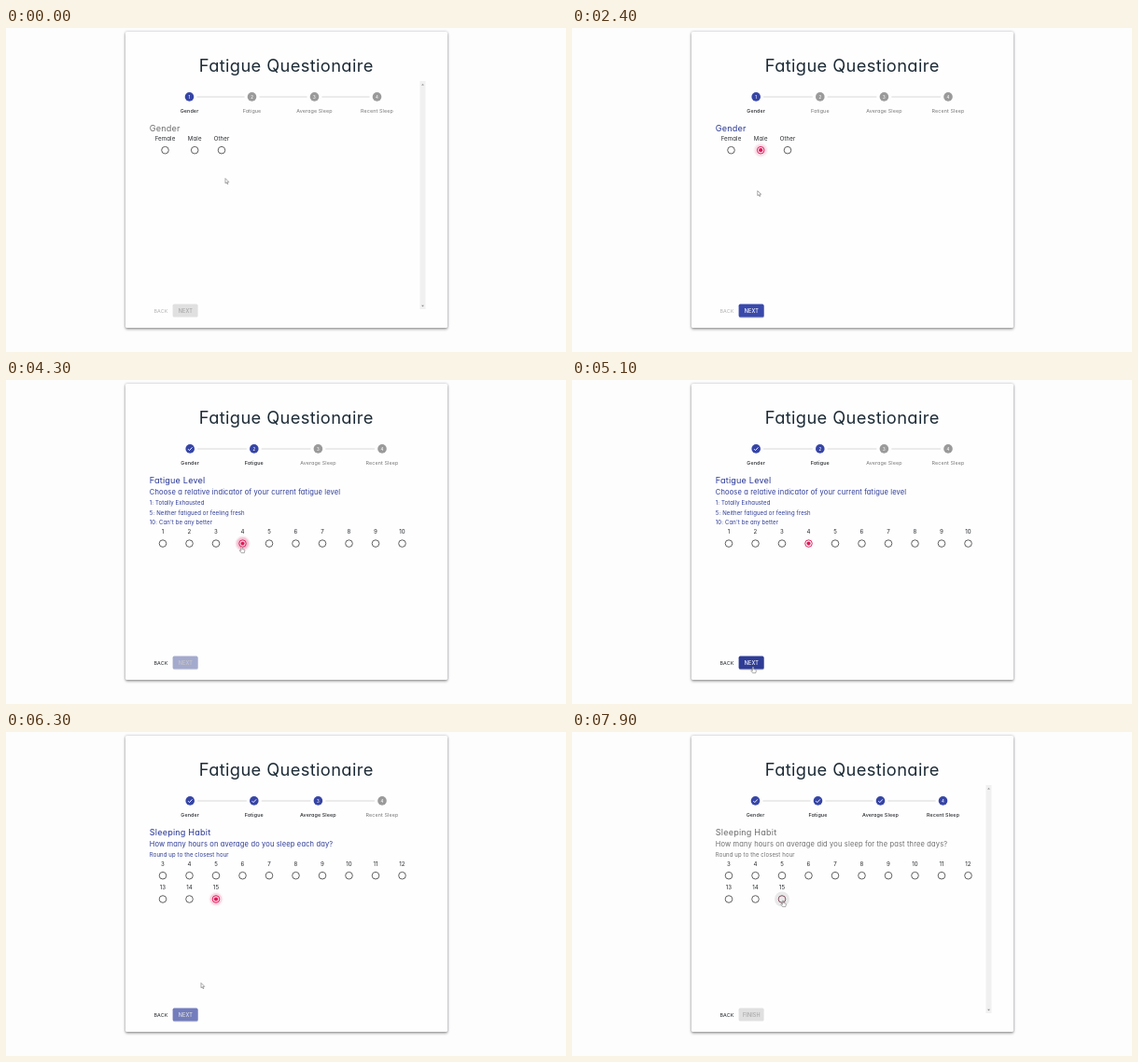
Recreate the animation shown at these times as an HTML page. Size 600x348 px, loop 8 s.

```html
<!DOCTYPE html>
<html lang="en">
<head>
<meta charset="utf-8">
<title>Fatigue Questionaire</title>
<style>
  html, body { margin: 0; width: 100%; height: 100%; overflow: hidden; background: #fdfdfe; }
  .card {
    position: absolute; left: 128px; top: 4px; width: 345px; height: 317.5px;
    background: #fefefe; border-radius: 1.5px;
    box-shadow: 0 1.5px 3px rgba(0, 0, 0, .38), 0 0 3px rgba(0, 0, 0, .22);
  }
  svg { position: absolute; left: 0; top: 0; width: 600px; height: 348px; }
  text {
    font-family: Inter, "Open Sans", sans-serif;
    font-feature-settings: "cv11";
    letter-spacing: .02em;
  }
  .mid { text-anchor: middle; }
</style>
</head>
<body>
<div class="card"></div>
<svg viewBox="0 0 600 348">
  <text class="mid" x="300.2" y="47" font-size="18.3" fill="#1d2b36">Fatigue Questionaire</text>
  <g id="scene"></g>
</svg>
<script>
const LOOP = 8000;
const INK = '#25282c', MUTED = '#777';
const GREY = [224, 224, 224], BLUE = [57, 73, 171], NAVY = [46, 60, 150];
const RING = [88, 88, 88], PINK = [224, 25, 90], TEXT_GREY = [110, 110, 110], TEXT_BLUE = [43, 57, 150];
const STEPS = ['Gender', 'Fatigue', 'Average Sleep', 'Recent Sleep'];

// Radio rows: columns 28.5 px apart, ten to a row
const grid = (first, count, top) => Array.from({ length: count }, (_, i) => ({
  label: String(first + i),
  x: 168 + 28.5 * (i % 10),
  y: top + 25.3 * Math.floor(i / 10)
}));

// start: page appears; pick: option chosen; press: button pushed
const pages = [
  {
    start: 0, pick: 2150, press: 2980, choice: 1, heading: 'Gender', notes: [],
    radios: [['Female', 170.5], ['Male', 202.2], ['Other', 231]].map(([label, x]) => ({ label, x, y: 131.2 }))
  },
  {
    start: 3200, pick: 4200, press: 5180, choice: 3, heading: 'Fatigue Level',
    sub: 'Choose a relative indicator of your current fatigue level',
    notes: ['1: Totally Exhausted', '5: Neither fatigued or feeling fresh', "10: Can't be any better"],
    radios: grid(1, 10, 175.6)
  },
  {
    start: 5300, pick: 6150, press: 7180, choice: 12, heading: 'Sleeping Habit',
    sub: 'How many hours on average do you sleep each day?',
    notes: ['Round up to the closest hour'], radios: grid(3, 13, 154.2)
  },
  {
    start: 7300, pick: 8000, press: 9000, choice: 12, heading: 'Sleeping Habit',
    sub: 'How many hours on average did you sleep for the past three days?',
    notes: ['Round up to the closest hour'], radios: grid(3, 13, 154.2)
  }
];

// Pointer tip: time, x, y
const path = [
  [0, 235, 161.5], [300, 200, 270], [600, 62, 278], [800, 40, 230], [1000, 118, 188],
  [1350, 229, 132], [1480, 228, 129], [1600, 212.5, 118.5], [1850, 203, 130], [2250, 203, 131],
  [2700, 187, 298], [2950, 186, 301], [3250, 187, 301], [3900, 250, 182], [4100, 252.5, 179],
  [4350, 252.5, 179], [4750, 200, 300], [5000, 194, 308], [5350, 194, 308], [5900, 224, 182],
  [6180, 225, 179], [6300, 209, 269.5], [6600, 200, 327], [6900, 195, 312], [7150, 192, 304],
  [7350, 192, 304], [7750, 225, 183], [7850, 226, 181], [8000, 226, 181]
];

const clamp = v => Math.max(0, Math.min(1, v));
const ease = v => { v = clamp(v); return v * v * (3 - 2 * v); };
const mix = (a, b, k) => `rgb(${a.map((v, i) => Math.round(v + (b[i] - v) * k))})`;
const pageAt = t => pages.findLastIndex(p => t >= p.start);

function pointer(t) {
  const i = Math.max(1, path.findIndex(p => p[0] >= t));
  const [t0, x0, y0] = path[i - 1], [t1, x1, y1] = path[i];
  const k = ease((t - t0) / (t1 - t0));
  return { x: x0 + (x1 - x0) * k, y: y0 + (y1 - y0) * k };
}

const overRadio = (p, r) => Math.hypot(p.x - r.x, p.y - r.y) < 7;
const overButton = p => p.x > 178.5 && p.x < 206 && p.y > 296 && p.y < 311;

// Share of the last 160 ms the pointer spent on a radio
function glow(t, page, r) {
  let n = 0;
  for (let k = 0; k < 8; k++) {
    const s = t - k * 20;
    if (s >= page.start && overRadio(pointer(s), r)) n++;
  }
  return n / 8;
}

const text = (x, y, size, fill, str, attrs = '') =>
  `<text x="${x}" y="${y}" font-size="${size}" fill="${fill}" ${attrs}>${str}</text>`;
const label = (x, y, size, fill, str, weight = 400) =>
  text(x, y, size, fill, str, `class="mid" font-weight="${weight}"`);
const disc = (x, y, r, fill, attrs = '') =>
  `<circle cx="${x}" cy="${y}" r="${r}" fill="${fill}" ${attrs}/>`;

function stepper(active, narrow) {
  const first = narrow ? 196.5 : 197.2, gap = narrow ? 67 : 68.6;
  return STEPS.map((name, i) => {
    const x = first + gap * i, lit = i <= active;
    const mark = i < active
      ? `<path d="M${x - 2.2} 74.1l1.5 1.5 3-3.2" fill="none" stroke="#fff" stroke-width=".9"/>`
      : label(x, 75.5, 4.3, '#fff', i + 1, 500);
    const line = i < 3
      ? `<path d="M${x + 8} 74H${x + gap - 8}" stroke="#bdbdbd" stroke-width=".6"/>` : '';
    return line + disc(x, 73.9, 4.8, lit ? mix(BLUE, NAVY, .3) : '#9a9a9a') + mark +
      label(x, 90.7, 5.4, lit ? INK : MUTED, name, lit ? 500 : 400);
  }).join('');
}

const scrollbar = () =>
  `<rect x="443.5" y="57" width="6" height="245" fill="#f0f0f0"/>
   <path d="M445.1 61.6l1.4-1.6 1.4 1.6zM445.1 297.8l1.4 1.6 1.4-1.6z" fill="#8a8a8a"/>`;

function radio(t, page, r, i) {
  const chosen = i === page.choice;
  const dot = chosen ? ease((t - page.pick) / 120) : 0;
  const tint = chosen ? ease((t - page.pick + 150) / 150) : 0;
  const halo = glow(t, page, r);
  const pulse = dot && t < page.pick + 450 ? 1 - (t - page.pick) / 450 : 0;
  return disc(r.x, r.y, 8, dot ? mix(RING, PINK, .8) : '#333', `opacity="${halo * .1}"`) +
    disc(r.x, r.y, 6.5, mix(RING, PINK, 1), `opacity="${pulse * .22}"`) +
    disc(r.x, r.y, 3.8, 'none', `stroke="${mix(RING, PINK, tint)}" stroke-width=".95"`) +
    disc(r.x, r.y, 2.1 * dot, mix(PINK, PINK, 0)) +
    label(r.x, r.y - 10.4, 6.1, INK, r.label);
}

function form(t, page) {
  const focus = ease((t - page.pick) / 60) * (1 - ease((t - page.press) / 80));
  const tone = mix(TEXT_GREY, TEXT_BLUE, focus);
  return text(153.8, 111.3, 9.1, tone, page.heading) +
    (page.sub ? text(153.8, 122.8, 7.5, tone, page.sub) : '') +
    page.notes.map((n, i) => text(153.8, 133.9 + 10.75 * i, 6, tone, n)).join('') +
    page.radios.map((r, i) => radio(t, page, r, i)).join('');
}

function buttons(t, page, index, p) {
  const on = ease((t - page.pick) / 250);
  const hover = on === 1 && overButton(p);
  const wave = clamp((t - page.press) / 300);
  const fill = hover ? mix(NAVY, NAVY, 0) : mix(GREY, BLUE, on);
  return text(158.4, 305.6, 5.4, index ? INK : '#b4b4b4', 'BACK') +
    `<rect x="179" y="297.8" width="27" height="13.8" rx="2" fill="#000" opacity="${on * .22}"/>
     <rect x="178.6" y="296.6" width="27" height="14" rx="1.6" fill="${fill}"/>` +
    (wave > 0
      ? `<clipPath id="face"><rect x="178.6" y="296.6" width="27" height="14" rx="1.6"/></clipPath>` +
        disc(p.x, p.y, 4 + 20 * wave, '#fff', 'opacity=".22" clip-path="url(#face)"')
      : '') +
    label(192.3, 305.6, 5.5, mix([166, 166, 166], [255, 255, 255], on), index === 3 ? 'FINISH' : 'NEXT', 500);
}

function cursor(p, hand) {
  const d = hand
    ? 'M-.6 .3q.6-.7 1.2 0v2.3l2.2.6q.7.3.5 1.2l-.5 2.3h-3.1l-2-2.6q.3-.8 1.1-.2l.6.5z'
    : 'M0 0v5.3l1.2-1.1.9 2 .9-.4-.9-1.9h1.7z';
  return `<path transform="translate(${p.x} ${p.y})" d="${d}" fill="#fff" stroke="#666" stroke-width=".55"/>`;
}

const scene = document.getElementById('scene');

function draw(now) {
  const t = now % LOOP;
  const index = pageAt(t), page = pages[index];
  const p = pointer(t), empty = t < page.pick;
  const hand = page.radios.some(r => overRadio(p, r)) || (!empty && overButton(p));
  scene.innerHTML = stepper(index, empty) + (empty ? scrollbar() : '') +
    form(t, page) + buttons(t, page, index, p) + cursor(p, hand);
}

const origin = performance.now();
function tick() {
  draw(performance.now() - origin);
  requestAnimationFrame(tick);
}
tick();
</script>
</body>
</html>
```
